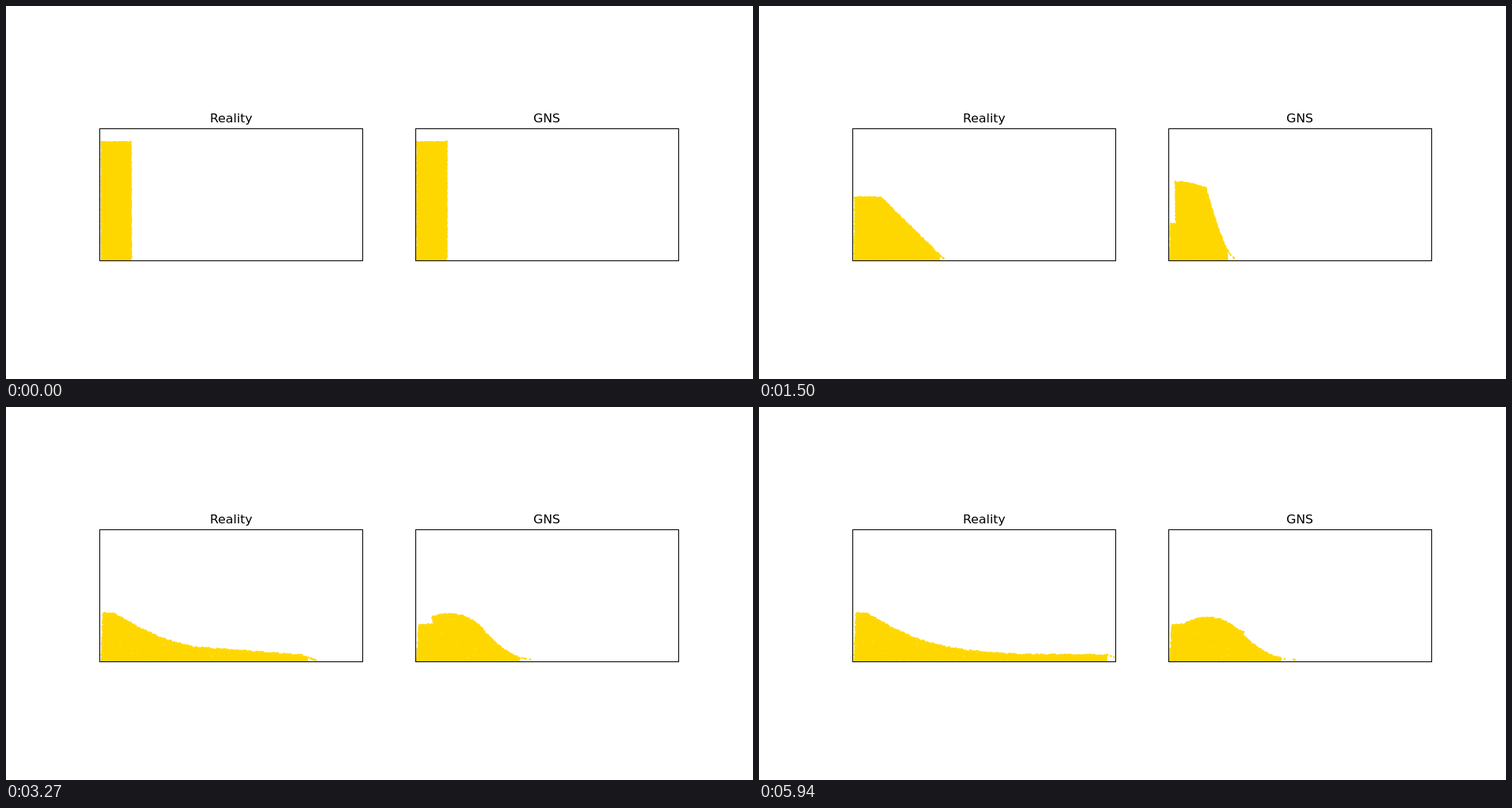
An HTML page with a canvas that plays this animation: 1000 px wide and 500 px high, repeating every 5.97 s.

```html
<!DOCTYPE html>
<html lang="en">
<head>
<meta charset="utf-8">
<title>Granular column collapse</title>
<style>
html, body { margin: 0; width: 100%; height: 100%; overflow: hidden; background: #fff; }
canvas { display: block; }
</style>
</head>
<body>
<canvas id="stage" width="1000" height="500"></canvas>
<script>
const ctx = document.getElementById('stage').getContext('2d');
const LOOP = 5970, STEP = 30;
const FLOOR = 341, COLUMN = 159.5, AREA = 6640;
const GOLD = '#ffd700', DOT = 1.35, SPACING = 1.5;

function seeded(seed) {
  return () => {
    seed = (seed + 0x6d2b79f5) | 0;
    let n = Math.imul(seed ^ (seed >>> 15), 1 | seed);
    n ^= n + Math.imul(n ^ (n >>> 7), 61 | n);
    return ((n ^ (n >>> 14)) >>> 0) / 4294967296;
  };
}

// Accelerating start and gentle stop, from 0 to 1.
const settle = (t, time, power) => 1 - Math.exp(-((t / time) ** power));
const mix = (a, b, u) => a + (b - a) * u;

// Each surface runs from the foot of the wall to the front, as [x, height].

// A wedge of constant area runs out over the pile that stays behind.
function realitySurface(t) {
  const foot = 127, wall = 477;
  const top = mix(COLUMN, 65.5, settle(t, 1232, 2.234));
  const front = 168.5 + 320 * settle(t, 2720, 2.1);
  const spare = Math.max(10, top * (front - foot) - AREA);
  const slope = top * top / 2 / spare * Math.exp(-Math.max(0, t - 2160) / 1300);
  const nose = Math.max(0.35, slope);

  const height = x => {
    const rest = 8 + 57 * Math.exp(-((Math.max(0, x - 143) / 75) ** 1.2));
    const flow = 9 + slope * (front - 7 / nose - x);
    return Math.min(top, 2 + nose * (front - x), Math.max(rest, flow));
  };

  const lean = 2.5 * settle(t, 2000, 2.5);
  const end = Math.min(front, wall);
  const points = [[foot, 0]];
  for (let x = foot + lean; x < end; x++) points.push([x, height(x)]);
  points.push([end, height(end)]);
  return points;
}

// A block leans off the wall, leaves a ledge there and rounds into a dome.
function learnedSurface(t) {
  const foot = 549.5;
  const sink = settle(t, 1740, 1.75);
  const lean = settle(t, 2150, 2.5);
  const top = mix(COLUMN, 59.5, sink);
  const front = 591 + 126.5 * settle(t, 2160, 2.1);
  const corner = 591 + 50 * settle(t, 2630, 3.1);
  const tip = corner + 8 * Math.max(0, (t - 4830) / 1110);
  const drop = 15.5 * sink;
  const dome = x => top - drop * ((x - corner + 41) / 41) ** 2;
  const left = foot + 21.5 * lean;

  const points = [[foot, 0], [foot + 3 * lean, 48], [foot + 4 * lean, 50], [left + 3 * lean, 50]];
  for (let x = left; x < tip; x++) points.push([x, dome(x)]);
  points.push([tip, dome(tip)]);

  const power = Math.min(2.15, 1.2 + t * 0.00025);
  const shoulder = dome(corner);
  for (let u = 0.06; u < 1.001; u += 0.02) {
    points.push([mix(corner, front, u), 3 + (shoulder - 3) * Math.max(0, 1 - u) ** power]);
  }
  return points;
}

function makePanel(title, left, surface, tail, spread, seed) {
  const rand = seeded(seed);
  const rough = Array.from({ length: 700 }, () => rand() - 0.5);
  const specks = Array.from({ length: Math.round(spread * 0.25) }, () => ({
    x: left + 3 + rand() * spread,
    y: rand() < 0.3 ? 340 : 278 + rand() * 60,
    r: 0.3 + rand() * 0.3
  }));
  return { title, left, surface, tail, rough, specks };
}

// Visits evenly spaced places on a line, with the inward normal.
function walk(points, visit) {
  let next = 0, index = 0;
  for (let k = 1; k < points.length; k++) {
    const [ax, ay] = points[k - 1];
    const dx = points[k][0] - ax, dy = points[k][1] - ay;
    const len = Math.hypot(dx, dy);
    for (; next < len; next += SPACING) {
      const f = next / len;
      visit(ax + dx * f, ay + dy * f, -dy / len, dx / len, index++);
    }
    next -= len;
  }
}

function drawSand(panel, t) {
  const points = panel.surface(t).map(([x, h]) => [x, FLOOR - h]);
  const loose = settle(t, 1800, 2);
  const bodyEnd = points[points.length - 1][0] - panel.tail * loose;
  const body = new Path2D(), dots = new Path2D();
  body.moveTo(points[0][0] + 1, FLOOR);
  walk(points, (x, y, nx, ny, i) => {
    const rough = panel.rough[i % panel.rough.length];
    const inTail = x > bodyEnd + 0.5;
    if (inTail && rough > 0) return;
    const depth = 1.1 + rough * (1 + 1.2 * loose);
    const gx = x + nx * depth, gy = y + ny * depth;
    dots.moveTo(gx + DOT, gy);
    dots.arc(gx, gy, DOT, 0, 2 * Math.PI);
    if (!inTail) body.lineTo(x + nx * 1.4, y + ny * 1.4);
  });
  body.lineTo(bodyEnd - 1, FLOOR);
  body.closePath();

  ctx.save();
  ctx.beginPath();
  ctx.rect(panel.left, 164, 353, 177.5);
  ctx.clip();
  ctx.fillStyle = GOLD;
  ctx.fill(body);
  ctx.fill(dots);

  ctx.clip(body);
  ctx.globalAlpha = 0.7 * loose;
  ctx.fillStyle = '#fff';
  for (const { x, y, r } of panel.specks) {
    ctx.beginPath();
    ctx.arc(x, y, r, 0, 2 * Math.PI);
    ctx.fill();
  }
  ctx.restore();
}

function drawPanel(panel, t) {
  drawSand(panel, t);
  ctx.strokeStyle = '#000';
  ctx.lineWidth = 1.11;
  ctx.strokeRect(panel.left + 0.5, 164.5, 352, 177);
  ctx.fillStyle = '#000';
  ctx.font = '16.667px "DejaVu Sans", sans-serif';
  const width = ctx.measureText(panel.title).width;
  ctx.fillText(panel.title, Math.round(panel.left + 176 - width / 2), 156);
}

const panels = [
  makePanel('Reality', 125, realitySurface, 10, 350, 11),
  makePanel('GNS', 548, learnedSurface, 18, 150, 29)
];

function frame(now) {
  const t = Math.floor(Math.max(0, now - start) % LOOP / STEP) * STEP;
  ctx.fillStyle = '#fff';
  ctx.fillRect(0, 0, 1000, 500);
  for (const panel of panels) drawPanel(panel, t);
  requestAnimationFrame(frame);
}

const start = performance.now();
frame(start);
</script>
</body>
</html>
```
